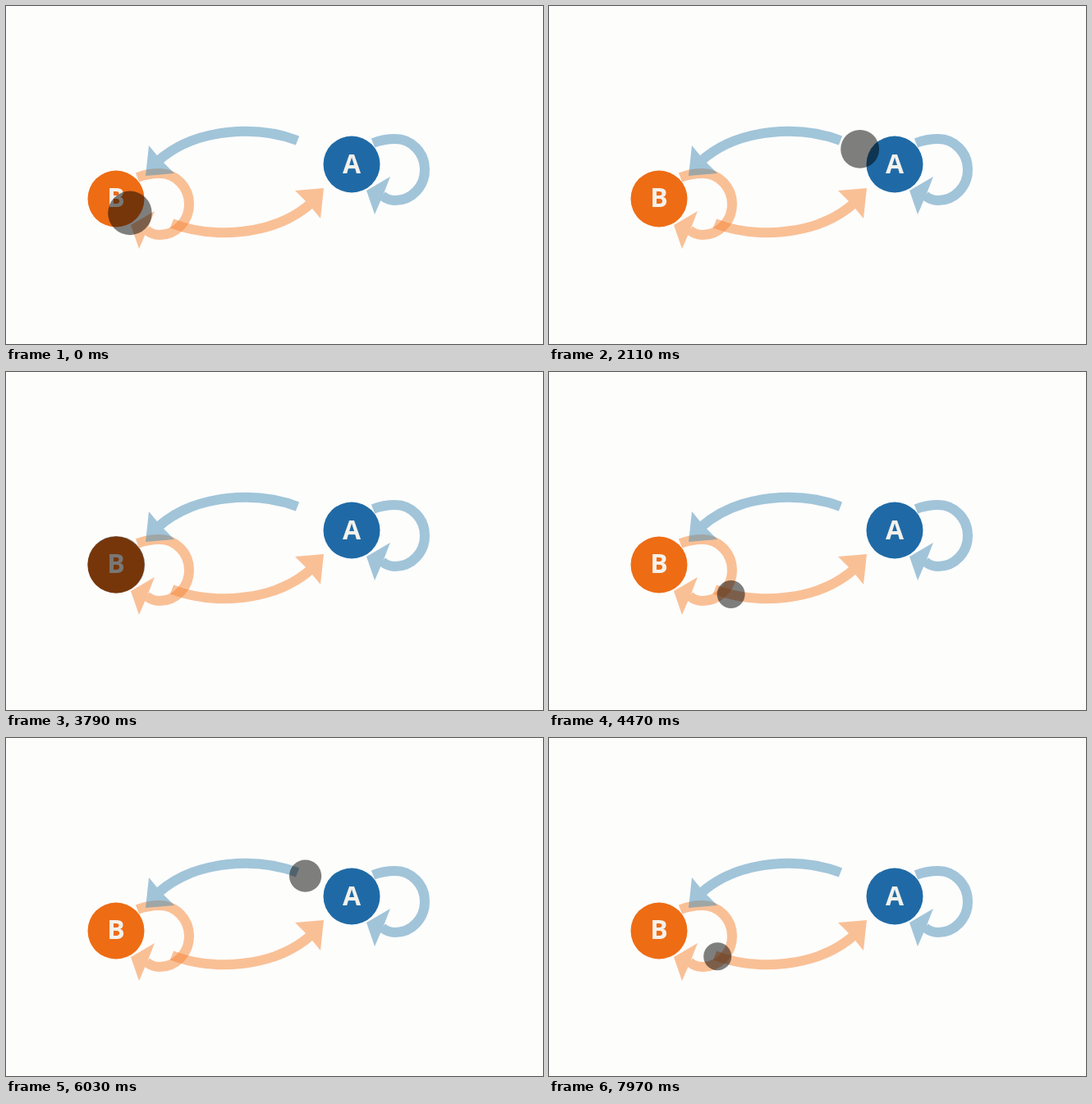
Animation of 654 by 412 pixels, one loop 7.99 s. Source, as an HTML page:

```html
<!DOCTYPE html>
<html lang="en">
<head>
<meta charset="utf-8">
<title>Two-state Markov chain</title>
<style>
  html, body { margin: 0; width: 100%; height: 100%; overflow: hidden; background: #fdfdfc; }
  svg { display: block; width: 100vw; height: 100vh; }
  .link { opacity: .5; }
  .blue { fill: #478db7; stroke: #478db7; }
  .amber { fill: #f68433; stroke: #f68433; }
  text { font: 700 32px "Open Sans", sans-serif; fill: #f4f1ec; text-anchor: middle; }
</style>
</head>
<body>
<svg viewBox="0 0 654 412">
  <defs>
    <g id="arc">
      <path id="arcLine" fill="none" stroke-width="12" d="M355 164C308 146 232 147 185 189"/>
      <polygon stroke="none" points="170,207 174,170 188,187 205,204"/>
    </g>
    <g id="ring">
      <path id="ringLine" fill="none" stroke-width="12"
        d="M447 167Q460 162 474 162A36 37.500 0 0 1 474 237Q465 237 458 231"/>
      <polygon stroke="none" points="439,225 468,208 459,231 449,254"/>
    </g>
  </defs>
  <g class="link amber"><use href="#ring" x="-287" y="42"/></g>
  <g class="link amber"><use href="#arc" transform="rotate(180 278.5 214.5)"/></g>
  <g class="link blue"><use href="#arc"/></g>
  <g class="link blue"><use href="#ring"/></g>
  <circle cx="421" cy="193" r="34.500" fill="#1f6aa6"/>
  <circle cx="134" cy="235" r="34.500" fill="#ee6c14"/>
  <text x="421" y="204">A</text>
  <text x="134" y="245">B</text>
  <circle id="ball" opacity=".5"/>
</svg>
<script>
const LOOP = 7990, TRAVEL = 1050, SMALL = 17, BIG = 35;
const byId = id => document.getElementById(id);
const ball = byId('ball');
const A = { x: 421, y: 193 }, B = { x: 134, y: 235 };

const route = (id, to, map) => {
  const line = byId(id), length = line.getTotalLength();
  return { to, at: f => map(line.getPointAtLength(f * length)) };
};
const AB = route('arcLine', B, p => ({ x: p.x, y: p.y }));
const BA = route('arcLine', A, p => ({ x: 557 - p.x, y: 429 - p.y }));
const BB = route('ringLine', B, p => ({ x: p.x - 287, y: p.y + 42 }));

const hops = [
  [BB, -1210], [BA, 423], [AB, 2328], [BA, 4350], [AB, 6187], [BA, 7950]
].map(([path, start]) => ({ path, start }));

const ease = u => u < .5 ? 4 * u ** 3 : 1 - 4 * (1 - u) ** 3;
const mix = (a, b, f) => a + (b - a) * f;

// Three even samples of motion are shown for 20, 20 and 100 ms.
function sampleTime(ms) {
  const p = ms + 10, rest = p % 140;
  const step = rest < 20 ? 0 : rest < 40 ? 1 : 2;
  return p - rest + step * 140 / 3 - 10;
}

function pose(t) {
  const i = hops.findLastIndex(h => h.start <= t);
  const { path, start } = hops[i], next = hops[i + 1];
  const end = start + TRAVEL;
  if (t <= end) return { ...path.at((t - start) / TRAVEL), r: SMALL };

  // Between links: into the node's centre, then out to the next link.
  const half = (next.start - end) / 2, u = (t - end) / half;
  const f = ease(u < 1 ? u : 2 - u);
  const edge = u < 1 ? path.at(1) : next.path.at(0);
  return {
    x: mix(edge.x, path.to.x, f),
    y: mix(edge.y, path.to.y, f),
    r: mix(SMALL, BIG, f)
  };
}

function draw(ms) {
  const { x, y, r } = pose(sampleTime(ms));
  ball.setAttribute('cx', x);
  ball.setAttribute('cy', y);
  ball.setAttribute('r', r);
}

const begin = performance.now();
function tick() {
  draw((performance.now() - begin) % LOOP);
  requestAnimationFrame(tick);
}
tick();
</script>
</body>
</html>
```
